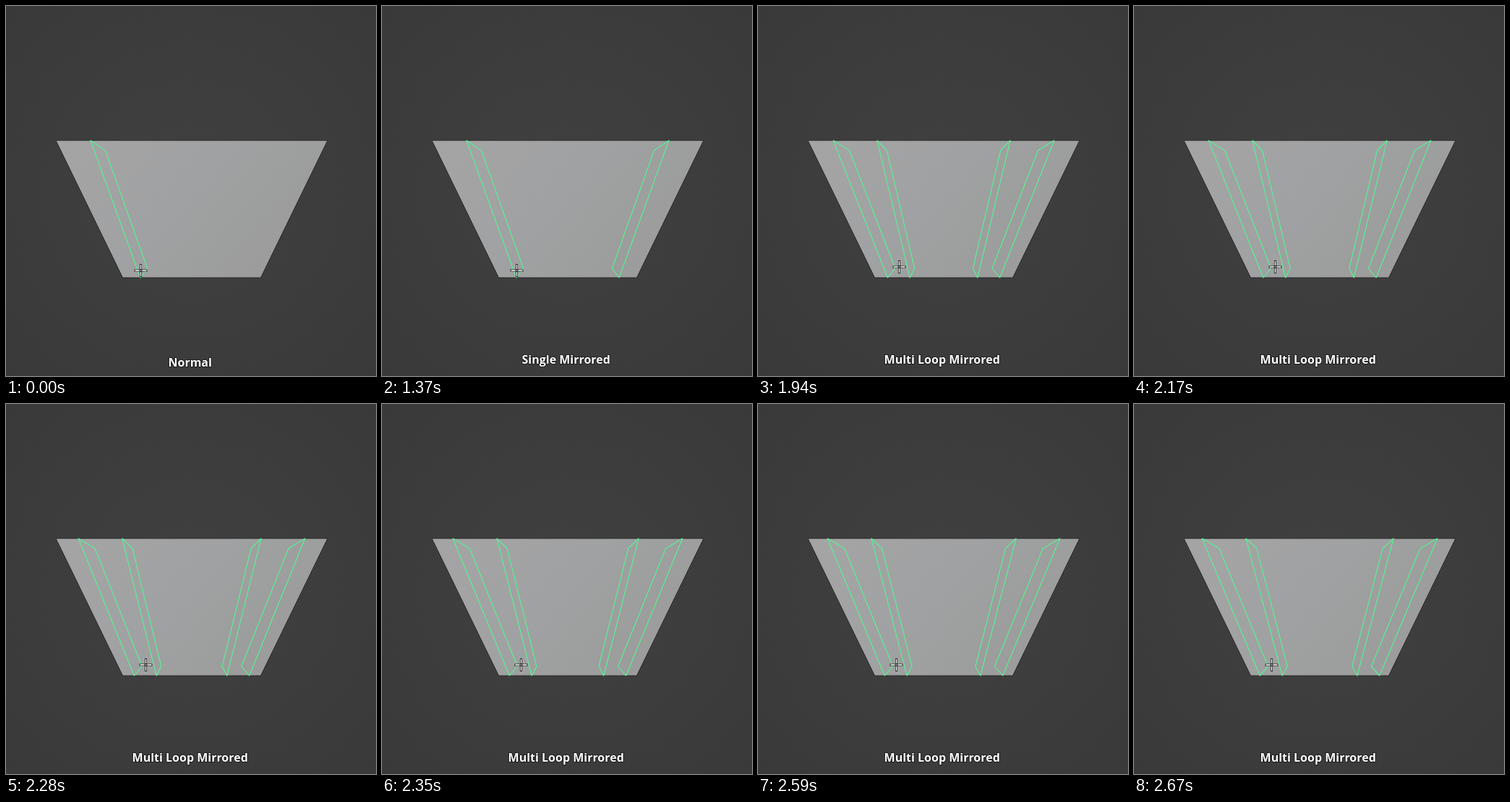
An HTML page for the animation above (2910 ms loop, 512 px wide and 512 px high).

```html
<!DOCTYPE html>
<html lang="en">
<head>
<meta charset="utf-8">
<title>Loop cut modes</title>
<style>
  html, body { margin: 0; width: 100%; height: 100%; overflow: hidden; background: #3c3c3c; }
  svg { display: block; width: 100%; height: 100%; }
  text { font: 700 16px "Open Sans", "Noto Sans", sans-serif; text-anchor: middle; fill: #fff;
         stroke: #1c1c1c; stroke-width: 2px; stroke-linejoin: round; paint-order: stroke; }
</style>
</head>
<body>
<svg viewBox="0 0 512 512">
  <defs>
    <radialGradient id="bg" cx=".5" cy=".5" r=".72">
      <stop offset="0" stop-color="#404040"/>
      <stop offset=".5" stop-color="#3d3d3d"/>
      <stop offset="1" stop-color="#393939"/>
    </radialGradient>
    <linearGradient id="face" gradientUnits="userSpaceOnUse" x1="110" y1="190" x2="330" y2="390">
      <stop offset="0" stop-color="#a4a4a5"/>
      <stop offset=".5" stop-color="#a0a1a2"/>
      <stop offset="1" stop-color="#9b9c9b"/>
    </linearGradient>
  </defs>
  <rect width="512" height="512" fill="url(#bg)"/>
  <path d="M69 186H445L352.500 376H161.500Z" fill="url(#face)" stroke="#272727" stroke-width="1"/>
  <path id="loops" fill="none" stroke="#57f294" stroke-width="1.150" stroke-linejoin="round"/>
  <g id="cursor" fill="none">
    <path d="M-9 0H-1M1 0H9M0-9V-1M0 1V9" stroke="#222" stroke-width="3"/>
    <path d="M-8 0H-2M2 0H8M0-8V-2M0 2V8" stroke="#fff" stroke-width="1.300"/>
  </g>
  <text id="label" x="254.700"></text>
</svg>
<script>
  const PERIOD = 2910, MID = 257, SPACING = 60.7;
  const $ = id => document.getElementById(id);

  // Half widths of the front and back edges, in drawing order
  const edges = [[188, 186], [160.5, 200], [82.5, 363], [95.5, 376]];

  // Start time and top-left x of the dragged loops
  const drag = [[1940, 104.2], [2170, 103.2], [2240, 102.2], [2280, 100.2],
                [2350, 98.2], [2590, 96.2], [2670, 94.2]];

  function loop(x, side) {
    const k = (MID - x) / edges[0][0];
    const points = edges.map(([half, y]) => (MID - side * k * half).toFixed(2) + " " + y);
    return "M" + points.join("L") + "Z";
  }

  const mirrored = x => loop(x, 1) + loop(x, -1);

  function pose(t) {
    if (t < 1370) return { text: "Normal", y: 499, d: loop(117, 1), cx: 186.5, cy: 366 };
    if (t < 1940) return { text: "Single Mirrored", y: 495, d: mirrored(117), cx: 186.5, cy: 366 };
    const x = drag.filter(([start]) => t >= start).pop()[1];
    return {
      text: "Multi Loop Mirrored", y: 495,
      d: mirrored(x) + mirrored(x + SPACING),
      cx: Math.round(195 - (104.2 - x) / 2) + 0.5, cy: 361
    };
  }

  function draw(t) {
    const p = pose(t);
    $("loops").setAttribute("d", p.d);
    $("cursor").setAttribute("transform", `translate(${p.cx} ${p.cy})`);
    $("label").setAttribute("y", p.y);
    $("label").textContent = p.text;
  }

  const begin = performance.now();
  function tick() {
    draw((performance.now() - begin) % PERIOD);
    requestAnimationFrame(tick);
  }
  tick();
</script>
</body>
</html>
```
